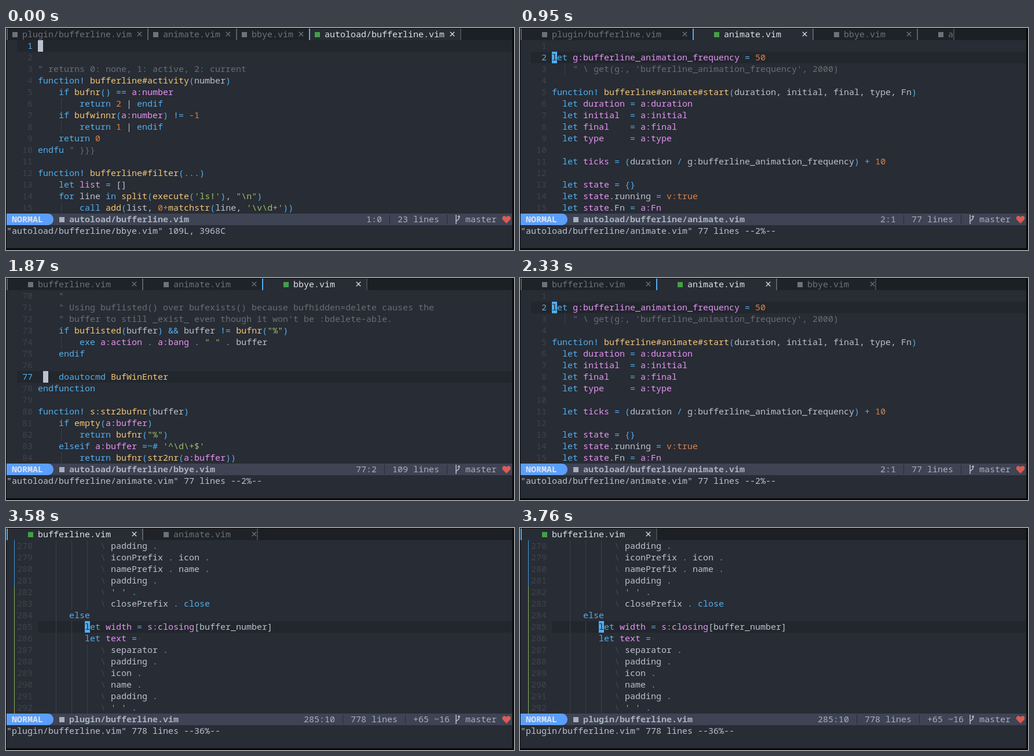
An HTML page for the animation above (9920 ms loop, 877 by 384 pixels).

```html
<!DOCTYPE html>
<html lang="en">
<head>
<meta charset="utf-8">
<title>Closing editor tabs</title>
<style>
html, body { margin: 0; width: 100%; height: 100%; overflow: hidden; background: #08090b; }
#term {
  position: absolute; left: 1px; top: 1px; width: 873px; height: 380px;
  overflow: hidden; background: #282c34; color: #bbc2cf;
  font: 15px/20px "Noto Sans Mono", "DejaVu Sans Mono", monospace;
  font-variant-ligatures: none;
}
#term div, #term svg { position: absolute; }
.text { white-space: pre; margin-top: -1px; height: 20px; }
.bold { font-weight: 700; }
.b { color: #51afef; } .m { color: #e693f5; } .y { color: #f3c677; }
.o { color: #da8548; } .g { color: #98be65; } .c { color: #686d74; }
.d { color: #444951; } .f { color: #bbc2cf; } .n { color: #3f444c; }
.s { color: #a9afbb; }
.on { color: #dfe2e7; } .off { color: #6d727a; }
#tabs { left: 0; top: 0; width: 873px; height: 20px; background: #1c1f24; }
.screen { inset: 0; visibility: hidden; }
.bar { left: 0; top: 320px; width: 873px; height: 20px; background: #3e4454; }
.pill { left: 0; top: 320px; width: 81px; height: 20px; background: #5b9efc; border-radius: 0 9px 9px 0 / 0 10px 10px 0; }
.line { background: #22262d; height: 20px; right: 0; }
.guide { width: 1px; background: #3b4048; }
svg { fill: none; stroke: currentColor; }
</style>
</head>
<body>
<div id="term"><div id="tabs"></div></div>
<script>
const CW = 9, RH = 20, LOOP = 9920;
const term = document.getElementById('term');
const tabBar = document.getElementById('tabs');

function box(parent, x, y, w, h, color, cls = '') {
  const el = document.createElement('div');
  el.className = cls;
  el.style.cssText = `left:${x}px;top:${y}px;width:${w}px;height:${h}px;background:${color}`;
  parent.append(el);
  return el;
}

// "@x" switches to colour class x.
function put(parent, col, row, markup, cls = 'f') {
  const el = document.createElement('div');
  el.className = 'text ' + cls;
  el.style.left = col * CW + 'px';
  el.style.top = row * RH + 'px';
  const parts = markup.split(/@([a-z])/);
  el.append(parts[0]);
  for (let i = 1; i < parts.length; i += 2) {
    const span = document.createElement('span');
    span.className = parts[i];
    span.textContent = parts[i + 1];
    el.append(span);
  }
  parent.append(el);
}

function shape(parent, x, y, w, h, path, style) {
  parent.insertAdjacentHTML('beforeend',
    `<svg width="${w}" height="${h}" style="left:${x}px;top:${y}px;${style}"><path d="${path}"/></svg>`);
}

const fileMark = (parent, col, row, color) =>
  box(parent, col * CW + 1, row * RH + 6, 9, 9, color);

const raw = String.raw;
const screens = [
  {
    first: 1, line: 1, cursor: [6, ''], file: 'autoload/bufferline.vim',
    pos: '1:0', lines: '23 lines', msg: '"autoload/bufferline/bbye.vim" 109L, 3968C',
    guides: [[10, 6, 6], [10, 8, 8], [10, 15, 15]],
    code: raw`

@c" returns 0: none, 1: active, 2: current
@bfunction! @ybufferline#activity@b(@fnumber@b)
    @bif @ybufnr@b() == @ma:number
        @breturn @o2 @f| @bendif
    @bif @ybufwinnr@b(@ma:number@b) != @o-1
        @breturn @o1 @f| @bendif
    @breturn @o0
@bendfu @c" }}}

@bfunction! @ybufferline#filter@b(...)
    @blet @mlist @b= @f[]
    @bfor @fline @bin @ysplit@b(@yexecute@b(@g'ls!'@b)@f, @g"\n"@b)
        @bcall @yadd@b(@flist, @o0@b+@ymatchstr@b(@fline, @g'\v\d+'@b))`
  },
  {
    first: 1, line: 2, cursor: [6, 'l'], file: 'autoload/bufferline/animate.vim',
    pos: '2:1', lines: '77 lines', msg: '"autoload/bufferline/animate.vim" 77 lines --2%--',
    guides: [[8, 3, 3]],
    code: raw`
@blet @mg:bufferline_animation_frequency @b= @o50
    @c" \ get(g:, 'bufferline_animation_frequency', 2000)

@bfunction! @ybufferline#animate#start@b(@fduration, initial, final, type, Fn@b)
  @blet @mduration @b= @ma:duration
  @blet @minitial  @b= @ma:initial
  @blet @mfinal    @b= @ma:final
  @blet @mtype     @b= @ma:type

  @blet @mticks @b= (@fduration @b/ @fg:bufferline_animation_frequency@b) + @o10

  @blet @mstate @b= {}
  @blet @mstate@f.running @b= @ov:true
  @blet @mstate@f.Fn @b= @ma:Fn`
  },
  {
    first: 70, line: 77, cursor: [7, ''], file: 'autoload/bufferline/bbye.vim',
    pos: '77:2', lines: '109 lines', msg: '"autoload/bufferline/animate.vim" 77 lines --2%--',
    guides: [[10, 5, 5], [10, 13, 13], [10, 15, 15]],
    code: raw`    @c"
    @c" Using buflisted() over bufexists() because bufhidden=delete causes the
    @c" buffer to still _exist_ even though it won't be :bdelete-able.
    @bif @ybuflisted@b(@fbuffer@b) && @fbuffer @b!= @ybufnr@b(@g"%"@b)
        @bexe @ma:action @b. @ma:bang @b. @g" " @b. @fbuffer
    @bendif

    @bdoautocmd @yBufWinEnter
@bendfunction

@bfunction! @ys:str2bufnr@b(@fbuffer@b)
    @bif @yempty@b(@ma:buffer@b)
        @breturn @ybufnr@b(@g"%"@b)
    @belseif @ma:buffer @b=~# @g'^\d\+$'
        @breturn @ybufnr@b(@ystr2nr@b(@ma:buffer@b))`
  },
  {
    first: 278, line: 285, cursor: [15, 'l'], file: 'plugin/bufferline.vim', git: true,
    pos: '285:10', lines: '778 lines', msg: '"plugin/bufferline.vim" 778 lines --36%--',
    guides: [[9, 1, 15], [12, 1, 6], [12, 8, 15], [15, 1, 6], [15, 10, 15]],
    code: raw`            @d\ @fpadding @b.
            @d\ @ficonPrefix @b. @ficon @b.
            @d\ @fnamePrefix @b. @fname @b.
            @d\ @fpadding @b.
            @d\ @g' ' @b.
            @d\ @fclosePrefix @b. @bclose
      @belse
         @blet @mwidth @b= @ms:closing@f[buffer_number]
         @blet @mtext @b=@d·
            @d\ @fseparator @b.
            @d\ @fpadding @b.
            @d\ @ficon @b.
            @d\ @fname @b.
            @d\ @fpadding @b.
            @d\ @g' ' @b.`
  }
];

function buildStatus(el, s) {
  const rule = col => box(el, col * CW + 4, 322, 1, 16, '#272b35');
  box(el, 0, 0, 0, 0, '', 'bar').style.cssText = '';
  box(el, 0, 0, 0, 0, '', 'pill').style.cssText = '';
  put(el, 1, 16, 'NORMAL', 'on bold');
  fileMark(el, 10, 16, '#a9afbb');
  put(el, 12, 16, s.file, 's bold');
  const end = s.git ? 76 : 84;
  const linesCol = end - 1 - s.lines.length;
  rule(end);
  rule(linesCol - 2);
  put(el, linesCol, 16, s.lines, 's');
  put(el, linesCol - 3 - s.pos.length, 16, s.pos, 's');
  if (s.git) put(el, 78, 16, '+65 ~16', 's');
  shape(el, 774, 321, 9, 18, 'M2 1V17M7 3V7Q7 9 2 12M5 5L7 3L8.5 5', 'color:#b4bac5;stroke-width:1.6');
  put(el, 88, 16, 'master', 's');
  shape(el, 855, 323, 16, 15,
    'M8 14L1.5 7.5C-1.5 3 4-2 8 3C12-2 17.5 3 14.5 7.5Z', 'fill:#db5c54;stroke:none');
  put(el, 0, 17, s.msg);
}

function buildScreen(s) {
  const el = document.createElement('div');
  el.className = 'screen';
  const row = s.line - s.first + 1;
  const [col, char] = s.cursor;
  const line = box(el, 0, 0, 0, 0, '', 'line');
  line.style.cssText = `left:${s.git ? 54 : 18}px;top:${row * RH}px`;
  for (const [c, from, to] of s.guides)
    box(el, c * CW + 4, from * RH, 1, (to - from + 1) * RH, '#3b4048');
  if (s.git) {
    box(el, 13, 20, 1, 80, '#3f9bdc');
    box(el, 13, 100, 1, 220, '#8aad5c');
  }
  s.code.split('\n').forEach((text, i) => {
    const current = s.first + i === s.line && !s.git;
    put(el, 2, i + 1, String(s.first + i).padStart(3), current ? 'b' : 'n');
    put(el, 6, i + 1, text);
  });
  box(el, col * CW, row * RH, CW, RH, char ? '#51afef' : '#bbc2cf');
  if (char) {
    put(el, col, row, char);
    el.lastChild.style.color = '#23272e';
  }
  buildStatus(el, s);
  term.append(el);
  return el;
}

const views = screens.map(buildScreen);

const NAMES = ['bufferline.vim', 'animate.vim', 'bbye.vim', 'autoload/bufferline.vim'];
const CLOSES = [
  { at: 820, time: 170, width: 29, pads: [1, 2, 3, 3] },
  { at: 2330, time: 190, width: 20, pads: [3, 3, 3, 3] },
  { at: 3580, time: 180, width: 23, pads: [3, 3, 3, 3] }
];

// Draws one tab cut to width columns and returns the column after it.
function drawTab(col, name, pad, active, width = name.length + 6 + 2 * pad) {
  const tone = active ? 'on' : 'off';
  const x = col * CW;
  box(tabBar, x, 0, width * CW, RH, active ? '#282c34' : '#1f2228');
  box(tabBar, x, 0, 2, RH, active ? '#51afef' : '#5b6068');
  if (width > pad + 1) fileMark(tabBar, col + pad + 1, 0, active ? '#43a047' : '#6d727a');
  const start = pad + 3;
  if (width > start) put(tabBar, col + start, 0, name.slice(0, width - start), tone);
  const close = start + name.length + pad + 1;
  if (width > close)
    shape(tabBar, (col + close) * CW, 5, 9, 9, 'M.8 .8L8.2 8.2M8.2 .8L.8 8.2',
      `color:${active ? '#dfe2e7' : '#6d727a'};stroke-width:1.3`);
  return col + width;
}

function drawTabs(closed, step, active) {
  const job = CLOSES[closed - 1];
  const moving = job && step < 4;
  const pad = !job ? 0 : moving ? job.pads[step] : 3;
  const count = 4 - closed;
  const long = closed === 0 || (closed === 1 && moving);
  tabBar.textContent = '';
  let col = 0;
  for (let i = 0; i < count; i++)
    col = drawTab(col, (i === 0 && long ? 'plugin/' : '') + NAMES[i], pad, i === active);
  if (moving) {
    const width = step ? Math.floor(job.width * (4 - step) / 4) : job.width - 1;
    col = drawTab(col, NAMES[count], pad, false, width);
  }
  box(tabBar, col * CW, 0, 2, RH, '#454a52');
}

let shown = '';
function render(now) {
  const t = now % LOOP;
  const closed = CLOSES.filter(c => t >= c.at).length;
  const job = CLOSES[closed - 1];
  const step = job ? Math.min(4, Math.floor((t - job.at) / job.time * 4 + 1e-6)) : 0;
  const view = t < 820 ? 0 : t < 1870 ? 1 : t < 2330 ? 2 : t < 3580 ? 1 : 3;
  const key = [closed, step, view].join();
  if (key !== shown) {
    shown = key;
    drawTabs(closed, step, [3, 1, 2, 0][view]);
    views.forEach((el, i) => { el.style.visibility = i === view ? 'visible' : 'hidden'; });
  }
}

const begin = performance.now();
function tick() {
  render(performance.now() - begin);
  requestAnimationFrame(tick);
}
tick();
</script>
</body>
</html>
```
